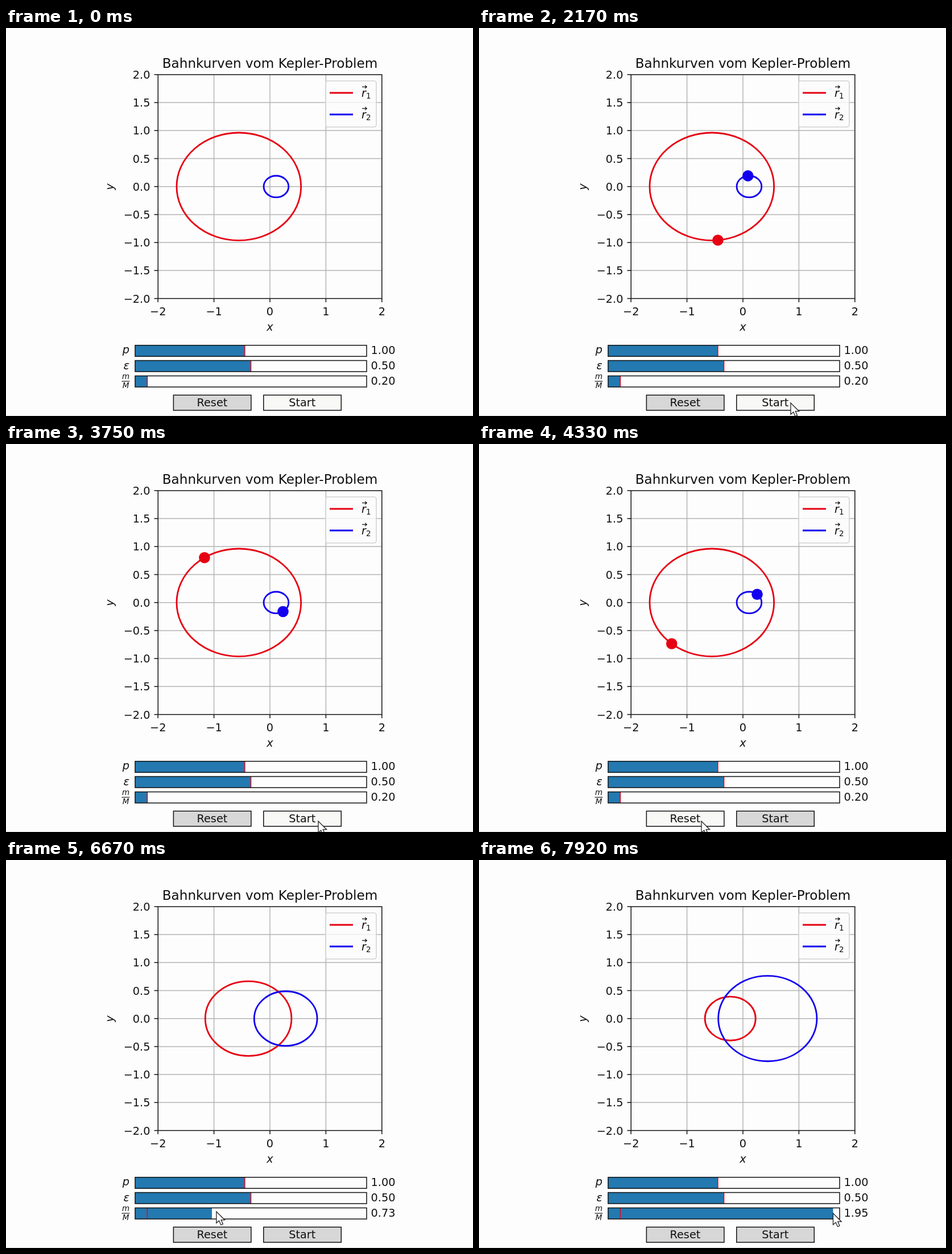
An HTML page with a canvas for the animation above (8000 ms loop, 821x682 px).

```html
<!DOCTYPE html>
<html lang="de">
<head>
<meta charset="utf-8">
<title>Bahnkurven vom Kepler-Problem</title>
<style>
html, body { margin: 0; width: 821px; height: 682px; overflow: hidden; background: #fdfdfd; }
canvas { display: block; }
</style>
</head>
<body>
<canvas id="c" width="821" height="682"></canvas>
<script>
const g = document.getElementById('c').getContext('2d');
const RED = '#e60012', BLUE = '#1200ee', BG = '#fdfdfd';
const X = x => 464 + 98.4 * x, Y = y => 278.7 - 98.4 * y;
const P = 1, ECC = 0.5, A = P / (1 - ECC * ECC), B = A * Math.sqrt(1 - ECC * ECC);
const FPS = 12, LOOP = 8000;
const START = 1, RESET = 5.4, DRAG = 6.33, OMEGA = -6.222, LAG = 0.027;
const BAR = { x: 227, w: 407, min: 0.1, max: 2 };

// cursor tip: [seconds, x, y]
const PATH = [
  [0.4, 609, 678], [0.75, 553, 663], [0.92, 548, 659], [3.1, 548, 659],
  [3.45, 555, 661], [3.75, 549, 663], [4.2, 391, 663], [5.45, 391, 663],
  [5.8, 272, 618], [6.33, 272, 618], [6.667, 370, 618], [7.667, 622.5, 621]
];

function tip(t) {
  const i = PATH.findIndex(k => k[0] > t);
  if (i < 0) return PATH[PATH.length - 1].slice(1);
  if (i === 0) return null;
  const [t0, x0, y0] = PATH[i - 1], [t1, x1, y1] = PATH[i];
  const u = (t - t0) / (t1 - t0);
  return [x0 + (x1 - x0) * u, y0 + (y1 - y0) * u];
}

function text(s, x, y, { size = 19.3, align = 'center', italic = false } = {}) {
  g.font = `${italic ? 'italic ' : ''}${size}px "DejaVu Sans", sans-serif`;
  g.textAlign = align;
  g.fillStyle = '#111';
  g.fillText(s, x, y);
}

function line(x0, y0, x1, y1, color = '#111', width = 1.5) {
  g.strokeStyle = color;
  g.lineWidth = width;
  g.beginPath();
  g.moveTo(x0, y0);
  g.lineTo(x1, y1);
  g.stroke();
}

function box(x, y, w, h, fill) {
  if (fill) {
    g.fillStyle = fill;
    g.fillRect(x, y, w, h);
  }
  g.strokeStyle = '#111';
  g.lineWidth = 1.5;
  g.strokeRect(x, y, w, h);
}

function orbit(scale, color) {
  g.strokeStyle = color;
  g.lineWidth = 2.8;
  g.beginPath();
  g.ellipse(X(-A * ECC * scale), Y(0), 98.4 * A * Math.abs(scale), 98.4 * B * Math.abs(scale), 0, 0, 7);
  g.stroke();
}

function body(scale, anomaly, color) {
  let e = anomaly;
  for (let i = 0; i < 30; i++) e -= (e - ECC * Math.sin(e) - anomaly) / (1 - ECC * Math.cos(e));
  g.fillStyle = color;
  g.beginPath();
  g.arc(X(scale * A * (Math.cos(e) - ECC)), Y(scale * B * Math.sin(e)), 9.8, 0, 7);
  g.fill();
}

function legend() {
  g.beginPath();
  g.roundRect(562, 93, 89, 81, 4);
  g.fillStyle = 'rgba(253,253,253,.8)';
  g.fill();
  g.strokeStyle = '#d2d2d2';
  g.lineWidth = 1.6;
  g.stroke();
  [RED, BLUE].forEach((color, i) => {
    const y = 114 + 38 * i;
    line(569, y, 610, y, color, 2.8);
    text('r', 625, y + 7, { align: 'left', italic: true });
    text(i + 1, 633, y + 10, { size: 13.5, align: 'left' });
    line(626, y - 10.5, 634, y - 10.5, '#111', 1.2);
    line(631, y - 13, 634.5, y - 10.5, '#111', 1.2);
    line(631, y - 8, 634.5, y - 10.5, '#111', 1.2);
  });
}

function plot(t, ratio) {
  const s1 = 1 / (1 + ratio), s2 = -ratio / (1 + ratio);
  for (let v = -1; v <= 1; v++) line(X(v), 82, X(v), 475.5, '#b4b4b4');
  for (let v = -1.5; v <= 1.5; v += 0.5) line(267, Y(v), 661, Y(v), '#b4b4b4');
  orbit(s1, RED);
  orbit(s2, BLUE);
  if (t >= START - 0.01 && t < RESET) {
    const m = OMEGA * (t - START);
    body(s1, m, RED);
    body(s2, m, BLUE);
  }
  box(267.3, 82, 393.5, 393.5);
  const label = (v, digits) => (v < 0 ? '−' : '') + Math.abs(v).toFixed(digits);
  for (let v = -2; v <= 2; v++) {
    line(X(v), 475.5, X(v), 482);
    text(label(v, 0), X(v), 505);
  }
  for (let v = -2; v <= 2; v += 0.5) {
    line(260.5, Y(v), 267, Y(v));
    text(label(v, 1), 253.5, Y(v) + 7, { align: 'right' });
  }
  text('Bahnkurven vom Kepler-Problem', 464, 69.5, { size: 23.15 });
  text('x', 464, 531.5, { italic: true });
  g.save();
  g.translate(189, 279);
  g.rotate(-Math.PI / 2);
  text('y', 0, 0, { italic: true });
  g.restore();
  legend();
}

function slider(y, value, init) {
  const at = v => (v.value - v.min) / (v.max - v.min) * BAR.w;
  const range = init.range;
  g.fillStyle = '#2379b0';
  g.fillRect(BAR.x, y, at({ value, ...range }), 19.5);
  const mark = BAR.x + at({ value: init.value, ...range });
  line(mark, y, mark, y + 19.5, '#d8102c', 1.7);
  box(BAR.x, y, BAR.w, 19.5);
  text(value.toFixed(2), 641.5, y + 15.5, { align: 'left' });
}

function controls(ratio, pos) {
  const range = { min: BAR.min, max: BAR.max };
  slider(557.7, P, { value: 1, range });
  slider(584.5, ECC, { value: 0.5, range: { min: 0, max: 1 } });
  slider(611.5, ratio, { value: 0.2, range });
  text('p', 217, 572, { align: 'right', italic: true });
  text('ε', 217, 600, { align: 'right', italic: true });
  text('m', 210.5, 617, { size: 13.5, italic: true });
  text('M', 210.5, 633, { size: 13.5, italic: true });
  line(203.5, 621, 217.5, 621, '#111', 1.2);

  const over = x => pos && pos[0] >= x && pos[0] <= x + 136.5 && pos[1] >= 645 && pos[1] <= 672;
  const button = (name, x, lit) => {
    box(x, 645.3, 136.5, 26.7, lit ? '#f8f8f7' : '#d7d7d7');
    text(name, x + 68, 665);
  };
  button('Reset', 294.4, over(294.4));
  // Start stays lit until the pointer first returns to the figure
  button('Start', 452.8, !pos || pos[1] > 672 || over(452.8));
}

function cursor([x, y]) {
  g.save();
  g.translate(x, y);
  g.beginPath();
  [[0, 0], [0, 20], [4.7, 16], [8, 23.5], [11.5, 22], [8.3, 14.7], [14.7, 14.7]]
    .forEach(p => g.lineTo(...p));
  g.closePath();
  g.fillStyle = '#fff';
  g.fill();
  g.strokeStyle = '#222';
  g.lineWidth = 1.3;
  g.stroke();
  g.restore();
}

function draw(t) {
  const pos = tip(t);
  const ratio = t < DRAG ? 0.2
    : BAR.min + (tip(t - LAG)[0] - BAR.x) / BAR.w * (BAR.max - BAR.min);
  g.fillStyle = BG;
  g.fillRect(0, 0, 821, 682);
  line(0, 681.5, 821, 681.5, '#e3e3e3', 1.4);
  plot(t, ratio);
  controls(ratio, pos);
  if (pos) cursor(pos);
}

const begin = performance.now();
function tick() {
  const ms = (performance.now() - begin) % LOOP;
  draw(Math.floor((ms + 3.4) * FPS / 1000) / FPS);
  requestAnimationFrame(tick);
}
tick();
</script>
</body>
</html>
```
